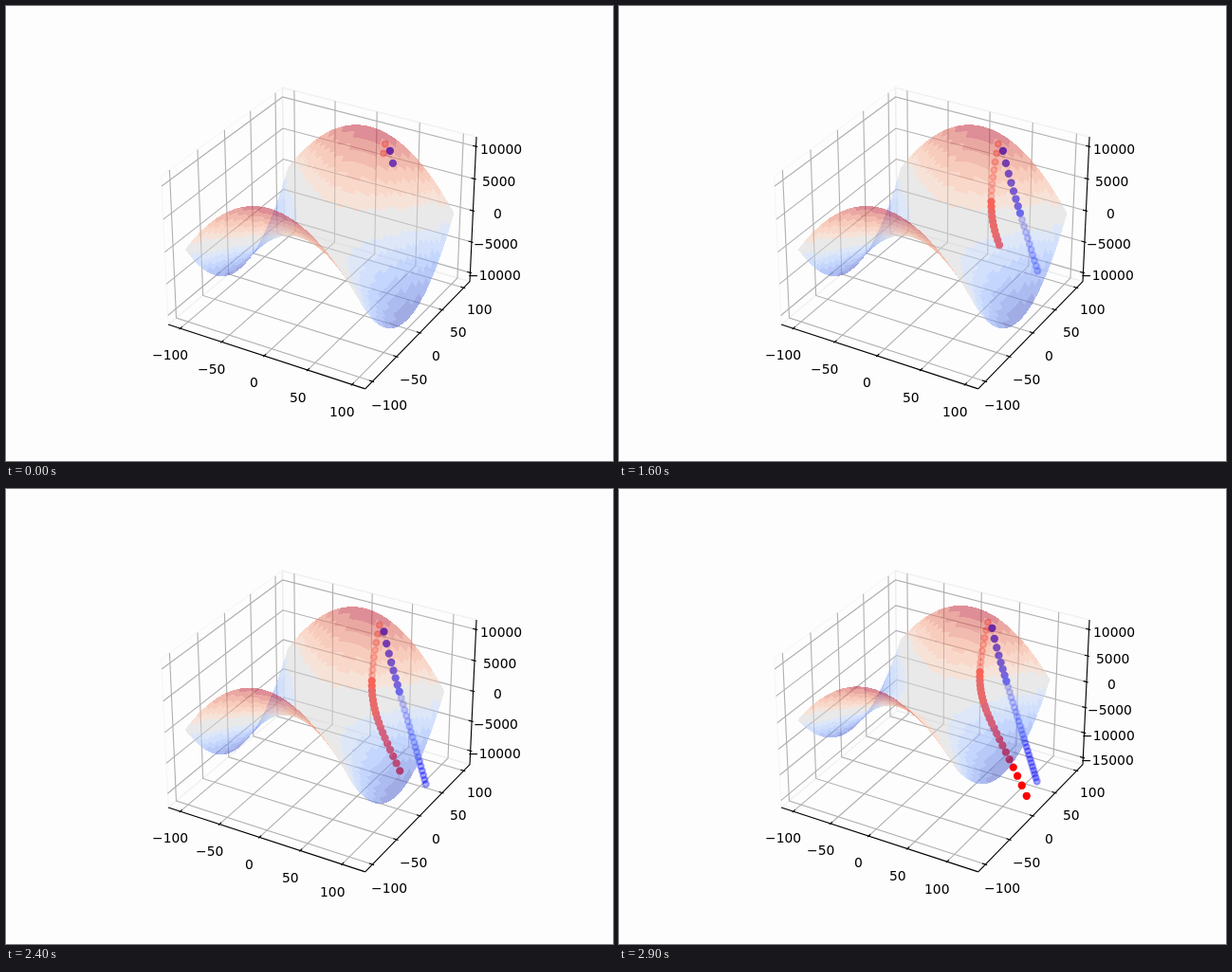
An HTML page with a canvas that plays this animation: 640x480 px, repeating every 3 s.

```html
<!DOCTYPE html>
<html>
<head>
<meta charset="utf-8">
<title>Descent paths on a saddle</title>
<style>
  html, body { margin: 0; width: 100%; height: 100%; overflow: hidden; background: #fdfdfd; }
  canvas { display: block; width: 640px; height: 480px; }
</style>
</head>
<body>
<canvas id="stage" width="640" height="480"></canvas>
<script>
const W = 640, H = 480, STEPS = 30, STEP_MS = 100;
const ctx = document.getElementById('stage').getContext('2d', { willReadFrequently: true });

const PT = 100 / 72;             // pixels per point
const BOX = [8 / 7, 8 / 7, 6 / 7];
const SCALE = 369.6 / 0.185;
const CENTER = [333, 237.4];
const LO = -1 / 48, HI = 49 / 48; // pane edges in normalised axis units
const LABEL_GAP = 0.0864;
const C30 = Math.sqrt(3) / 2;

const saddle = (x, y) => y * y - x * x;

// Perspective view of normalised coordinates at elevation 30, azimuth -60.
function project(n) {
  const [x, y, z] = n.map((v, i) => (v - 0.5) * BOX[i]);
  const depth = 10 - (C30 / 2 * x - 0.75 * y + 0.5 * z);
  const right = C30 * x + 0.5 * y;
  const up = -0.25 * x + C30 / 2 * y + C30 * z;
  return { x: CENTER[0] + SCALE * right / depth, y: CENTER[1] - SCALE * up / depth, depth };
}

// Plain gradient descent (red) and Adagrad (blue) from the same start.
function buildPaths() {
  const red = [], blue = [];
  let [rx, ry] = [20, 100], [bx, by] = [20, 100], sumX = 0, sumY = 0;
  for (let i = 0; i <= STEPS; i++) {
    rx *= 1.06;
    ry *= 0.94;
    sumX += bx * bx;
    sumY += by * by;
    bx += 8 * bx / Math.sqrt(sumX);
    by -= 8 * by / Math.sqrt(sumY);
    red.push([rx, ry, saddle(rx, ry)]);
    blue.push([bx, by, saddle(bx, by)]);
  }
  return { red, blue };
}
const paths = buildPaths();

const COLORMAP = [
  [59, 76, 192], [98, 130, 234], [141, 176, 254], [185, 208, 249], [213, 213, 213],
  [245, 196, 173], [244, 154, 123], [222, 96, 77], [180, 4, 38]
];
function colorAt(t) {
  const level = Math.min(13, Math.floor(t * 14));
  const p = (level === 6 || level === 7 ? 0.5 : (level + 0.5) / 14) * 8;
  const i = Math.min(7, Math.floor(p));
  return COLORMAP[i].map((c, k) => c + (COLORMAP[i + 1][k] - c) * (p - i));
}

function buildQuads(cells) {
  const quads = [], at = i => -100 + 200 * i / cells;
  for (let i = 0; i < cells; i++) {
    for (let j = 0; j < cells; j++) {
      const corners = [[i, j], [i + 1, j], [i + 1, j + 1], [i, j + 1]]
        .map(([a, b]) => [at(a), at(b), saddle(at(a), at(b))]);
      const mean = corners.reduce((s, c) => s + c[2], 0) / 4;
      quads.push({ corners, color: colorAt((mean + 10000) / 20000) });
    }
  }
  return quads;
}
const quads = buildQuads(50);

function axisLimits(count) {
  const seen = [...paths.red.slice(0, count), ...paths.blue.slice(0, count)];
  const pad = (a, b) => [a - 0.05 * (b - a), b + 0.05 * (b - a)];
  return [
    pad(-100, Math.max(100, ...seen.map(p => p[0]))),
    pad(-100, 100),
    pad(Math.min(-10000, ...seen.map(p => p[2])), 10000)
  ];
}

function line(color, width, ...nodes) {
  ctx.strokeStyle = color;
  ctx.lineWidth = width * PT;
  ctx.beginPath();
  for (const n of nodes) {
    const p = project(n);
    ctx.lineTo(p.x, p.y);
  }
  ctx.stroke();
}

function drawPanes() {
  const floor = [[LO, LO, LO], [HI, LO, LO], [HI, HI, LO], [LO, HI, LO], [LO, LO, LO]];
  const left = [[LO, LO, LO], [LO, HI, LO], [LO, HI, HI], [LO, LO, HI], [LO, LO, LO]];
  const back = [[LO, HI, LO], [HI, HI, LO], [HI, HI, HI], [LO, HI, HI], [LO, HI, LO]];
  line('rgba(242,242,242,.5)', 1, ...left);
  line('rgba(230,230,230,.5)', 1, ...back);
  line('rgba(236,236,236,.5)', 1, ...floor);
}

const AXES = [
  { step: 50, edge: v => [v, LO, LO], tickDir: 1, out: -1, away: [0, -1, -1],
    grid: v => [[v, LO, LO], [v, HI, LO], [v, HI, HI]] },
  { step: 50, edge: v => [HI, v, LO], tickDir: 0, out: 1, away: [1, 0, -1],
    grid: v => [[HI, v, LO], [LO, v, LO], [LO, v, HI]] },
  { step: 5000, edge: v => [HI, HI, v], tickDir: 0, out: 1, away: [1, 1, 0],
    grid: v => [[HI, HI, v], [LO, HI, v], [LO, LO, v]] }
];

function drawLabel(value, node) {
  const text = String(value).replace('-', '\u2212');
  const p = project(node);
  ctx.fillText(text, Math.round(p.x - ctx.measureText(text).width / 2), Math.round(p.y + 11));
}

function drawAxis(axis, [min, max]) {
  const ticks = [];
  for (let v = Math.ceil(min / axis.step) * axis.step; v <= max; v += axis.step) ticks.push(v);
  const norm = v => (v - min) / (max - min);

  for (const v of ticks) line('#b0b0b0', 0.8, ...axis.grid(norm(v)));
  line('#000', 0.8, axis.edge(LO), axis.edge(HI));
  for (const v of ticks) {
    const base = axis.edge(norm(v));
    const shifted = d => base.map((c, i) => i === axis.tickDir ? c + d * axis.out / 12 : c);
    line('#000', 0.8, shifted(0.1), shifted(-0.2));
    drawLabel(v, base.map((c, i) => c + axis.away[i] * LABEL_GAP));
  }
}

function drawDot(dot, alpha) {
  ctx.fillStyle = ctx.strokeStyle = `rgba(${dot.rgb},${alpha})`;
  ctx.lineWidth = 1.5 * PT;
  ctx.beginPath();
  ctx.arc(dot.x, dot.y, Math.sqrt(20) / 2 * PT, 0, 2 * Math.PI);
  ctx.fill();
  ctx.stroke();
}

// In each pair the nearer dot is solid and the farther one is faded.
function drawDots(count, toScreen) {
  const pairs = [];
  for (let i = 0; i < count; i++) {
    pairs.push([
      { ...toScreen(paths.red[i]), rgb: '255,0,0' },
      { ...toScreen(paths.blue[i]), rgb: '0,0,255' }
    ].sort((a, b) => b.depth - a.depth));
  }
  pairs.sort((a, b) => b[1].depth - a[1].depth);
  for (const [far, near] of pairs) {
    drawDot(far, 0.3);
    drawDot(near, 1);
  }
}

// Blends a polygon at half opacity, without edge smoothing so that cells tile cleanly.
function blendPolygon(data, pts, color) {
  const ys = pts.map(p => p.y);
  const bottom = Math.min(H - 1, Math.ceil(Math.max(...ys)));
  for (let y = Math.max(0, Math.floor(Math.min(...ys))); y <= bottom; y++) {
    const cuts = [], cy = y + 0.5;
    pts.forEach((a, i) => {
      const b = pts[(i + 1) % pts.length];
      if ((a.y <= cy) !== (b.y <= cy)) cuts.push(a.x + (cy - a.y) / (b.y - a.y) * (b.x - a.x));
    });
    cuts.sort((a, b) => a - b);
    for (let k = 0; k + 1 < cuts.length; k += 2) {
      for (let x = Math.ceil(cuts[k] - 0.5); x + 0.5 < cuts[k + 1]; x++) {
        const o = (y * W + x) * 4;
        for (let c = 0; c < 3; c++) data[o + c] = (data[o + c] + color[c]) / 2;
      }
    }
  }
}

function drawSurface(toScreen) {
  const image = ctx.getImageData(0, 0, W, H);
  quads
    .map(q => {
      const pts = q.corners.map(toScreen);
      return { pts, color: q.color, depth: pts.reduce((s, p) => s + p.depth, 0) };
    })
    .sort((a, b) => b.depth - a.depth)
    .forEach(q => blendPolygon(image.data, q.pts, q.color));
  ctx.putImageData(image, 0, 0);
}

function render(step) {
  const count = step + 2;
  const limits = axisLimits(count);
  const toScreen = p => project(p.map((v, i) => (v - limits[i][0]) / (limits[i][1] - limits[i][0])));

  ctx.fillStyle = '#fdfdfd';
  ctx.fillRect(0, 0, W, H);
  ctx.fillStyle = '#000';
  ctx.font = `${10 * PT}px "DejaVu Sans", sans-serif`;
  drawPanes();
  AXES.forEach((axis, i) => drawAxis(axis, limits[i]));
  drawDots(count, toScreen);
  drawSurface(toScreen);
}

let shown = -1;
function tick() {
  const step = Math.floor(performance.now() / STEP_MS) % STEPS;
  if (step !== shown) render(shown = step);
  requestAnimationFrame(tick);
}
tick();
</script>
</body>
</html>
```
